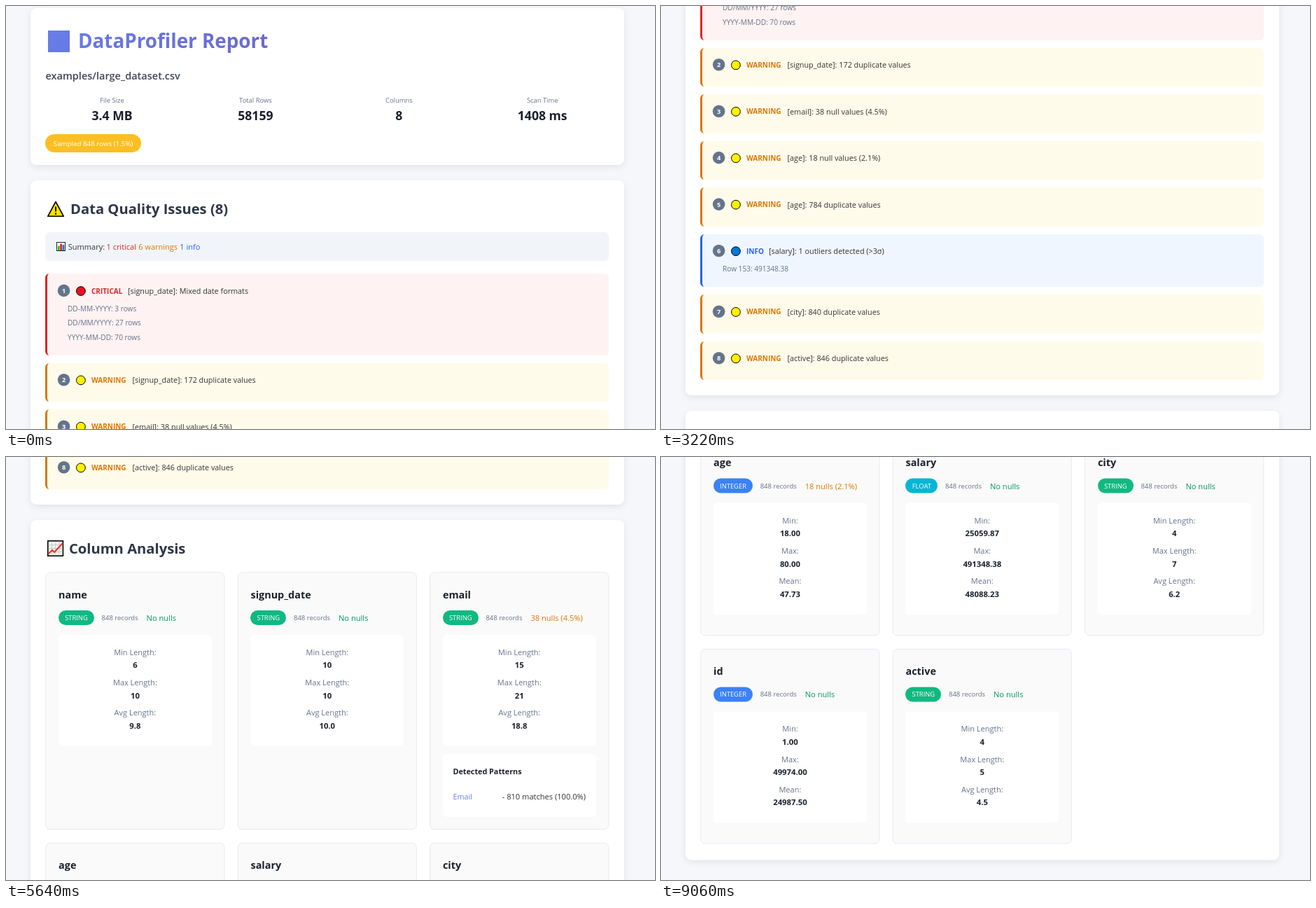
Recreate the animation shown at these times as an HTML page. Size 927 px wide and 604 px high, loop 9.85 s.

```html
<!DOCTYPE html>
<html lang="en">
<head>
<meta charset="utf-8">
<title>DataProfiler Report</title>
<style>
  html, body { margin: 0; width: 100%; height: 100%; overflow: hidden; background: #f5f7fb; }
  svg { display: block; font-family: "Open Sans", "Noto Sans", sans-serif; }
  .card { fill: #fff; filter: drop-shadow(0 3px 5px rgba(0, 0, 0, .08)); }
</style>
</head>
<body>
<svg width="927" height="604" viewBox="0 0 927 604">
  <defs>
    <linearGradient id="brand" gradientUnits="userSpaceOnUse" x1="247" y1="-161" x2="670" y2="261">
      <stop stop-color="#667eea"/><stop offset="1" stop-color="#764ba2"/>
    </linearGradient>
  </defs>
  <g id="page"></g>
</svg>
<script>
const page = document.getElementById('page');
const SLATE = '#64748b', INK = '#1a202c', HEAD = '#2d3748', BODY = '#333';
const RED = '#dc2626', AMBER = '#d97706', BLUE = '#2563eb', GREEN = '#059669';

// y is the middle of the capital letters
const text = (x, y, str, size, fill, weight = 400, anchor = 'start') =>
  `<text x="${x}" y="${y + size * .357}" font-size="${size}" fill="${fill}" font-weight="${weight}" text-anchor="${anchor}">${str}</text>`;
const rect = (x, y, w, h, r, fill, extra = '') =>
  `<rect x="${x}" y="${y}" width="${w}" height="${h}" rx="${r}" fill="${fill}" ${extra}/>`;
// A rectangle with its edges on whole pixels
const box = (x, y, w, h, r, fill, extra) => {
  const left = Math.round(x), top = Math.round(y);
  return rect(left, top, Math.round(x + w) - left, Math.round(y + h) - top, r, fill, extra);
};
const circle = (x, y, r, fill, extra = '') =>
  `<circle cx="${x}" cy="${y}" r="${r}" fill="${fill}" ${extra}/>`;
const path = (d, fill, extra = '') => `<path d="${d}" fill="${fill}" ${extra}/>`;
const card = (top, bottom) => box(34.6, top, 848.4, bottom - top, 8.8, '#fff', 'class="card"');

function header() {
  const stats = [['File Size', '3.4 MB'], ['Total Rows', '58159'], ['Columns', '8'], ['Scan Time', '1408 ms']];
  return card(2.5, 227) +
    rect(60, 35, 31, 31, 0, 'url(#brand)') +
    text(103, 50.5, 'DataProfiler Report', 27.8, 'url(#brand)', 700) +
    text(56.5, 99.5, 'examples/large_dataset.csv', 14.5, '#3f4756', 600) +
    stats.map(([label, value], i) => {
      const x = 151.5 + i * 204.9;
      return text(x, 134.5, label, 9.4, SLATE, 400, 'middle') + text(x, 156.5, value, 17.6, INK, 700, 'middle');
    }).join('') +
    box(56.4, 183, 136.9, 26.3, 13.1, '#fbbf24') +
    text(67.5, 197, 'Sampled 848 rows (1.5%)', 9.8, '#fff');
}

const LEVELS = {
  CRITICAL: { color: RED, back: '#fef2f2', dot: '#e81224', x: 174 },
  WARNING: { color: AMBER, back: '#fffbeb', dot: '#fff100', x: 180.5 },
  INFO: { color: BLUE, back: '#eff6ff', dot: '#0078d7', x: 154 }
};

const ISSUES = [
  ['CRITICAL', '[signup_date]: Mixed date formats', 'DD-MM-YYYY: 3 rows', 'DD/MM/YYYY: 27 rows', 'YYYY-MM-DD: 70 rows'],
  ['WARNING', '[signup_date]: 172 duplicate values'],
  ['WARNING', '[email]: 38 null values (4.5%)'],
  ['WARNING', '[age]: 18 null values (2.1%)'],
  ['WARNING', '[age]: 784 duplicate values'],
  ['INFO', '[salary]: 1 outliers detected (&gt;3σ)', 'Row 153: 491348.38'],
  ['WARNING', '[city]: 840 duplicate values'],
  ['WARNING', '[active]: 846 duplicate values']
];

function issue(y, h, number, level, message, details) {
  const { color, back, dot, x } = LEVELS[level], r = 5.85, edge = 3;
  const top = Math.round(y), side = Math.round(y + h) - top - 2 * r;
  return box(56.4, y, 804.6, h, r, back) +
    path(`M${56 + r} ${top}a${r} ${r} 0 0 0 ${-r} ${r}v${side}a${r} ${r} 0 0 0 ${r} ${r}` +
      `a${r - edge} ${r} 0 0 1 ${edge - r} ${-r}v${-side}a${r - edge} ${r} 0 0 1 ${r - edge} ${-r}z`, color) +
    circle(82.6, y + 24, 8.8, SLATE) +
    text(82.6, y + 24.3, number, 9.2, '#fff', 700, 'middle') +
    circle(106.9, y + 24.6, 6.4, dot, 'stroke="#000" stroke-width="1"') +
    text(122, y + 24.6, level, 10, color, 700) +
    text(x, y + 24.6, message, 10.8, BODY) +
    details.map((line, i) => text(88, y + 50 + i * 20.45, line, 10.1, SLATE)).join('');
}

function issues() {
  let y = 382.4, rows = '';
  ISSUES.forEach(([level, message, ...details], i) => {
    const h = 55.5 + 20.3 * details.length;
    rows += issue(y, h, i + 1, level, message, details);
    y += h + 10.95;
  });
  return card(249, 1006.4) +
    path('M71 279.5L82.3 300.3H59.7z', '#fce100', 'stroke="#000" stroke-width="1.6" stroke-linejoin="round"') +
    path('M71 286.5v7M71 295.5v2.2', 'none', 'stroke="#000" stroke-width="2"') +
    text(92, 289.5, 'Data Quality Issues (8)', 20.2, HEAD, 700) +
    box(56.4, 323, 804.6, 40.8, 5.85, '#f1f5f9') +
    rect(72.5, 337.5, 12, 12, 0, '#fff', 'stroke="#222"') +
    rect(74, 342.5, 2.6, 6.5, 0, '#16c60c') + rect(77.3, 339.5, 2.6, 9.5, 0, '#e81224') + rect(80.6, 341, 2.6, 8, 0, '#0078d7') +
    text(88.8, 344, 'Summary:', 11, BODY) +
    text(143.5, 344, '1 critical', 11, RED) +
    text(189.2, 344, '6 warnings', 11, AMBER) +
    text(248.3, 344, '1 info', 11, BLUE) + rows;
}

const TYPES = { STRING: ['#10b981', 50.7], INTEGER: ['#3b82f6', 55.8], FLOAT: ['#06b6d4', 45.6] };
const ROWS = [[1102.4, 367.7], [1488.8, 279], [1786.3, 278.7]];
const COLUMNS = [
  ['name', 'STRING', '', '6', '10', '9.8'],
  ['signup_date', 'STRING', '', '10', '10', '10.0'],
  ['email', 'STRING', '38 nulls (4.5%)', '15', '21', '18.8'],
  ['age', 'INTEGER', '18 nulls (2.1%)', '18.00', '80.00', '47.73'],
  ['salary', 'FLOAT', '', '25059.87', '491348.38', '48088.23'],
  ['city', 'STRING', '', '4', '7', '6.2'],
  ['id', 'INTEGER', '', '1.00', '49974.00', '24987.50'],
  ['active', 'STRING', '', '4', '5', '4.5']
];

function column([name, type, nulls, ...values], i) {
  const x = 56.4 + i % 3 * 274.4, [y, h] = ROWS[i / 3 | 0], left = x + 18.7;
  const [color, width] = TYPES[type], after = left + width + 10.8;
  const labels = type === 'STRING' ? ['Min Length:', 'Max Length:', 'Avg Length:'] : ['Min:', 'Max:', 'Mean:'];
  return rect(x + .4, y + .4, 255.2, h - .8, 6.5, '#fafafa', 'stroke="#e2e8f0" stroke-width=".9"') +
    text(left, y + 32, name, 14.4, INK, 700) +
    box(left, y + 54.4, width, 21, 10.5, color) +
    text(left + width / 2, y + 65.3, type, 9.4, '#fff', 400, 'middle') +
    text(after, y + 65.3, '848 records', 9.5, SLATE) +
    text(after + 64, y + 65.3, nulls || 'No nulls', 11.1, nulls ? AMBER : GREEN) +
    box(left, y + 89.5, 218.6, 159.5, 5.85, '#fff') +
    labels.map((label, j) =>
      text(x + 128, y + 114.5 + j * 43.3, label, 11, SLATE, 400, 'middle') +
      text(x + 128, y + 133 + j * 43.3, values[j], 11.3, INK, 700, 'middle')).join('') +
    (name === 'email' ?
      box(left, y + 260, 218.6, 89.5, 5.85, '#fff') +
      text(x + 33.2, y + 284.3, 'Detected Patterns', 10.8, INK, 700) +
      text(x + 33.2, y + 320.3, 'Email', 10.8, '#667eea') +
      text(x + 222.8, y + 320.3, '- 810 matches (100.0%)', 11.1, BODY, 400, 'end') : '');
}

function analysis() {
  return card(1028.3, 2087.5) +
    rect(59.8, 1057.8, 21.6, 21.4, 0, '#f2f2f2', 'stroke="#000" stroke-width="1.6"') +
    path('M65.5 1058.6v20M70.7 1058.6v20M75.9 1058.6v20M60.6 1063.5h20M60.6 1068.5h20M60.6 1073.5h20', 'none', 'stroke="#c4c4c4" stroke-width=".8"') +
    path('M61 1076l5-5 3 3 12-13', 'none', 'stroke="#e8341c" stroke-width="2"') +
    text(90, 1068.5, 'Column Analysis', 20.2, HEAD, 700) +
    COLUMNS.map(column).join('');
}

page.innerHTML = header() + issues() + analysis();

// The page scrolls in bursts of discrete steps: [first, last, count]
const LOOP = 9850;
const TICKS = [
  [1490, 2410, 10], [2510, 3410, 10], [3520, 3930, 5], [4120, 5050, 10], [5140, 6050, 10],
  [6150, 6460, 4], [6760, 7050, 4], [7260, 8150, 10], [8250, 9060, 9]
].flatMap(([a, b, n]) => Array.from({ length: n }, (_, i) => a + Math.floor((b - a) * i / (n - 1) / 10) * 10));

// Scroll curve over step count: [step, offset, speed]
const KNOTS = [
  [0, 0, 6], [9, 162, 29], [18, 450, 31], [25, 645, 18], [31, 786, 21], [41, 938, 19],
  [45, 1030, 17], [49, 1070, 7], [53, 1114.5, 9], [72, 1512.5, 5]
];

function scrollAt(step) {
  const i = Math.max(1, KNOTS.findIndex(k => k[0] >= step));
  const [a, p, v] = KNOTS[i - 1], [b, q, w] = KNOTS[i];
  const d = b - a, u = (step - a) / d, r = 1 - u;
  return r * r * ((1 + 2 * u) * p + u * d * v) + u * u * ((3 - 2 * u) * q - r * d * w);
}

function draw() {
  const t = performance.now() % LOOP;
  const step = TICKS.filter(tick => tick <= t).length;
  page.setAttribute('transform', `translate(0 ${-scrollAt(step)})`);
  requestAnimationFrame(draw);
}
draw();
</script>
</body>
</html>
```
